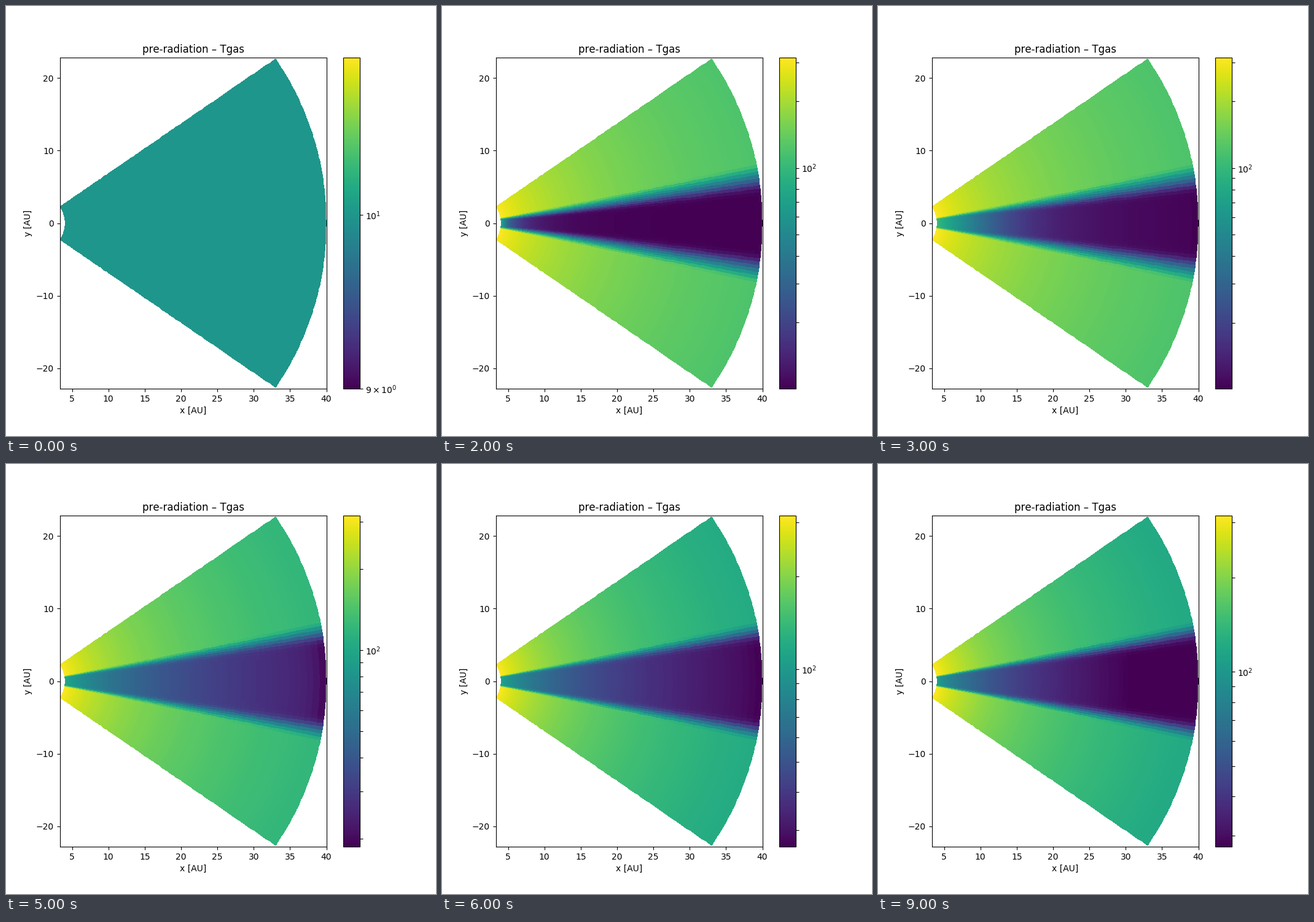
Recreate the animation shown at these times as a matplotlib script. Size 700x700 px, loop 10 s.

```python
import numpy as np
import matplotlib.pyplot as plt
from matplotlib.animation import FuncAnimation

R_IN, R_OUT, HALF = 4.0, 40.0, 0.6
N_R, N_TH = 100, 100
T_START, T_MAX = 10.0, 315.5
TOP = 22.793

plt.rcParams["text.kerning_factor"] = 6

r_edge = np.geomspace(R_IN, R_OUT, N_R + 1)
th_edge = np.linspace(-HALF, HALF, N_TH + 1)
r = np.sqrt(r_edge[1:] * r_edge[:-1])[:, None]
th = np.abs(th_edge[1:] + th_edge[:-1])[None, :] / 2

# starlight: a power law, cut off inside the shadow of the disk
shadow = 0.19 + 0.015 * r / R_OUT
ramp = 2.6 * (np.clip(shadow - th, 0, None) / 0.09) ** 1.2
depth = 1.5 + 16.5 * (1 - R_IN / r) ** 1.7
lit = T_MAX * (r / R_IN) ** -0.42 * np.exp(-np.minimum(ramp, depth))


def limits(t):
    if t == 0:
        return 0.9 * T_START, 1.1 * T_START
    return 10.02 + 17.6 / (1 + np.exp(-2.75 * (t - 5.01))), T_MAX


def scale(temp, t):
    low, high = limits(t)
    return np.log(temp / low) / np.log(high / low)


def midplane(t):
    """Warmth of the shadowed disk, as a fraction of the log scale."""
    inner = 0.54 + 0.14 * np.exp((3 - t) / 2)
    slope = 0.28 - 0.09 * np.exp((4 - t) / 2.5)
    front = 13 * 2.85 ** (t - 3)
    wave = 1 / (1 + (r / front) ** 3)
    rim = 1 - (r / R_OUT) ** 30
    return np.clip(inner - slope * np.log(r / R_IN), 0, 1) * wave * rim


def field(t):
    if t == 0:
        return np.full((N_R, N_TH), scale(T_START, 0))
    low, high = limits(t)
    mid = low * (high / low) ** midplane(t)
    return np.clip(scale((lit ** 4 + mid ** 4) ** 0.25, t), 0, 1)


def bar_ticks(t):
    low, high = limits(t)
    spots, labels = [], []
    for power in range(3):
        for digit in range(1, 10):
            temp = digit * 10 ** power
            if not low <= temp <= high:
                continue
            text = ""
            if digit == 1:
                text = rf"$\mathdefault{{10^{{{power}}}}}$"
            elif high < 2 * low:
                text = rf"$\mathdefault{{{digit}\times10^{{{power}}}}}$"
            spots.append(scale(temp, t))
            labels.append(text)
    return spots, labels


fig, ax = plt.subplots(figsize=(7, 7), dpi=100)
mesh = ax.pcolormesh(r_edge[:, None] * np.cos(th_edge),
                     r_edge[:, None] * np.sin(th_edge),
                     field(0), cmap="viridis", vmin=0, vmax=1)
bar = fig.colorbar(mesh, ax=ax)

ax.set_xticks(range(5, 41, 5))
ax.set_yticks(range(-20, 21, 10))
ax.set_xlim(R_IN * np.cos(HALF), R_OUT)
ax.set_ylim(-TOP, TOP)
ax.set_xlabel("x [AU]")
ax.set_ylabel("y [AU]")
ax.set_title("pre-radiation \u2013 Tgas")


def draw(t):
    mesh.set_array(field(t))
    spots, labels = bar_ticks(t)
    bar.set_ticks(spots, labels=labels)
    return [mesh]


anim = FuncAnimation(fig, draw, frames=10, interval=1000,
                     init_func=lambda: draw(0), repeat=True, repeat_delay=0)
plt.show()
```
